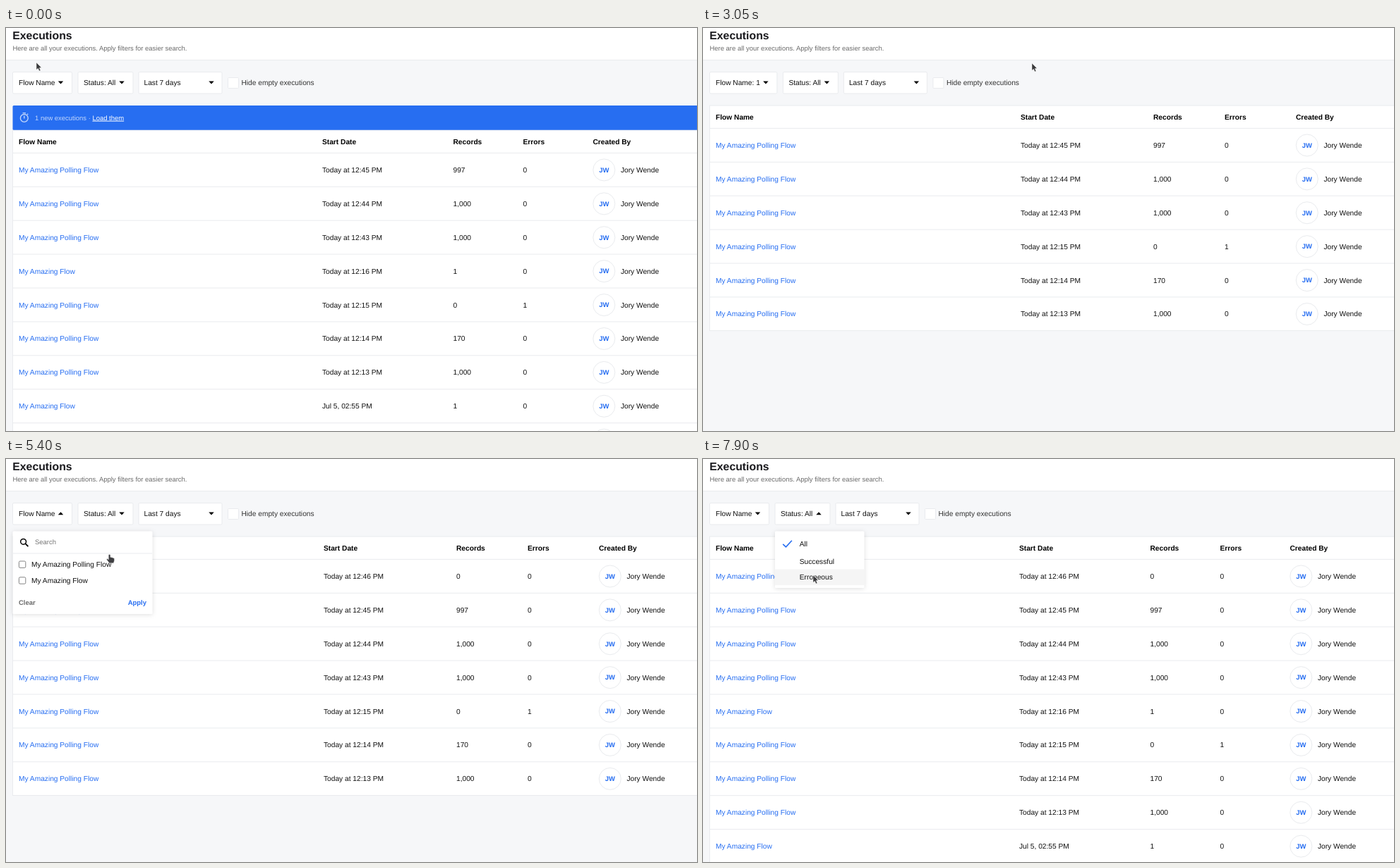
Animation of 979 by 572 pixels, one loop 8000 ms. Source, as an HTML page:

```html
<!DOCTYPE html>
<html lang="en">
<head>
<meta charset="utf-8">
<title>Executions</title>
<style>
  html, body { margin: 0; width: 100%; height: 100%; overflow: hidden; background: #f6f7f9; }
  svg { display: block; }
  text { font-family: "Liberation Sans", Arial, sans-serif; text-rendering: geometricPrecision; white-space: pre; }
  .panel { filter: drop-shadow(0 1px 3px rgba(0, 0, 0, .13)); }
</style>
</head>
<body>
<svg width="979" height="572" viewBox="0 0 979 572">
  <g id="page"></g>
  <g id="cursor"></g>
</svg>
<script>
const LOOP = 8000, STEP = 50;
const BLUE = '#276ef1', GREY = '#6b6b6b', LINE = '#e9ebee';
const OWNER = 'Jory Wende', INITIALS = 'JW';
const BODY = 10.2, SMALL = 9.46;
const ROW = 47.9, HEAD = 32.7, TABLE_TOP = 110, BANNER = 35;

// start date, records, errors, is polling flow
const RUNS = [
  ['Today at 12:46 PM', '0', '0', true],
  ['Today at 12:45 PM', '997', '0', true],
  ['Today at 12:44 PM', '1,000', '0', true],
  ['Today at 12:43 PM', '1,000', '0', true],
  ['Today at 12:16 PM', '1', '0', false],
  ['Today at 12:15 PM', '0', '1', true],
  ['Today at 12:14 PM', '170', '0', true],
  ['Today at 12:13 PM', '1,000', '0', true],
  ['Jul 5, 02:55 PM', '1', '0', false],
  ['Jul 5, 02:54 PM', '1', '0', false],
];
const flowName = polling => polling ? 'My Amazing Polling Flow' : 'My Amazing Flow';

// Each entry changes only the listed parts of the state.
const STATES = [
  [0, { menu: '', banner: true, filtered: false, fresh: false, checked: false, counted: false, focus: false, pollingFirst: false }],
  [1000, { menu: 'flow', focus: true }],
  [1900, { checked: true, focus: false }],
  [2000, { counted: true }],
  [3050, { menu: '', banner: false, filtered: true }],
  [3600, { fresh: true }],
  [4350, { menu: 'flow', focus: true, pollingFirst: true }],
  [5050, { checked: false, focus: false }],
  [5150, { counted: false }],
  [6200, { menu: '' }],
  [6400, { filtered: false }],
  [7100, { menu: 'status' }],
];

const PATH = [
  [0, 43, 49], [150, 43, 49], [400, 41, 98], [550, 38, 85], [1250, 38, 85], [1350, 39, 102],
  [1650, 39, 102], [1750, 80, 174], [2100, 80, 174], [2300, 80, 179], [2550, 186, 206],
  [2650, 186, 206], [2900, 466, 50], [3200, 466, 50], [4000, 82, 83], [4500, 82, 83],
  [4650, 67, 125], [4800, 67, 125], [4900, 70, 147], [5050, 70, 147], [5450, 150, 135],
  [5800, 192, 97], [5850, 192, 97], [6100, 137, 36], [6400, 137, 36], [6550, 142, 85],
  [7250, 142, 85], [7450, 172, 125], [7650, 156, 165], [LOOP, 156, 165],
];
const POINTERS = [
  [0, 'arrow'], [500, 'hand'], [1350, 'arrow'], [1750, 'hand'], [2700, 'arrow'], [3900, 'hand'],
  [4600, 'beam'], [4900, 'hand'], [5500, 'arrow'], [6500, 'hand'], [7900, 'arrow'],
];
const SHAPES = {
  arrow: `<path d="M0 0V10.3L2.4 8.3L4.1 12L5.9 11.2L4.3 7.6L7.2 7.2Z"
    fill="#3a3a3c" stroke="#fff" stroke-opacity=".75" stroke-width=".6"/>`,
  hand: `<path d="M-1.3 1.1Q-1.3 0 0 0T1.3 1.1V4Q2.5 3.4 3.3 4.4Q4.6 4 5.2 5Q6.8 4.8 6.9 6.3V8.6Q6.9 10 6 11V12.2H-.9V11.2
    L-3.8 7.6Q-4.3 6.6 -3.5 6.2T-1.3 7.4Z" fill="#3f3f42" stroke="#fff" stroke-opacity=".75" stroke-width=".5"/>`,
  beam: `<path d="M-2-5.5Q0-5.5 0-4.5Q0-5.5 2-5.5M0-4.5V4.5M-2 5.5Q0 5.5 0 4.5Q0 5.5 2 5.5"
    fill="none" stroke="#333"/>`,
};

const rect = (x, y, w, h, fill, more = '') =>
  `<rect x="${x}" y="${y}" width="${w}" height="${h}" fill="${fill}" ${more}/>`;
const hline = (y, x1 = 9.5, x2 = 979) => `<path d="M${x1} ${y}H${x2}" stroke="${LINE}"/>`;
const stroke = (d, color, width) => `<path d="${d}" fill="none" stroke="${color}" stroke-width="${width}"/>`;

// Text placed by the middle of its line box.
function text(x, mid, str, { size = BODY, fill = '#111', bold = false, anchor = 'start', more = '' } = {}) {
  return `<text x="${x}" y="${(mid + size * .3465).toFixed(2)}" font-size="${size}" fill="${fill}"
    font-weight="${bold ? 700 : 400}" text-anchor="${anchor}" ${more}>${str}</text>`;
}

function caret(x, up) {
  return up ? `<path d="M${x - 3.7} 79.2h7.4l-3.7-3.9z"/>` : `<path d="M${x - 3.7} 75.5h7.4l-3.7 3.9z"/>`;
}

const button = (x, w) => rect(x, 62.5, w, 30.5, '#fff', `stroke="${LINE}" rx="1.5"`);

function toolbar({ menu, counted }) {
  const shift = counted ? 11.4 : 0;
  return button(9.5, 84 + shift) + text(18, 77.5, counted ? 'Flow Name: 1' : 'Flow Name') +
    caret(77.5 + shift, menu === 'flow') +
    `<g transform="translate(${shift})">` +
    button(102, 78) + text(110, 77.5, 'Status: All') + caret(164, menu === 'status') +
    button(188, 118) + text(195.5, 77, 'Last 7 days') + caret(291, false) +
    rect(314.5, 70.5, 15, 15, '#fff', `stroke="${LINE}" rx="1"`) +
    text(333.5, 77.5, 'Hide empty executions', { fill: '#333' }) + '</g>';
}

function banner() {
  const light = '#c3d7fb';
  return rect(9.5, TABLE_TOP, 980, 34.7, BLUE, 'rx="1.5"') +
    `<circle cx="25.8" cy="127.9" r="5.4" fill="none" stroke="${light}" stroke-width="1.35"/>` +
    stroke('M23.6 120.6h4.4M25.8 124.8v3.6M30 123l1.2-1.2', light, 1.35) +
    text(41, 127.4, '1 new executions · <tspan fill="#fff" text-decoration="underline">Load them</tspan>',
      { size: SMALL, fill: light });
}

function table({ filtered, fresh, banner: hasBanner }) {
  const runs = RUNS.slice(fresh ? 0 : 1).filter(run => run[3] || !filtered);
  const [date, records, errors, owner] = filtered ? [450, 638, 739, 840] : [448, 633.5, 732.5, 831.5];
  const top = TABLE_TOP + (hasBanner ? BANNER : 0);
  const header = [[18, 'Flow Name'], [date, 'Start Date'], [records, 'Records'], [errors, 'Errors'], [owner, 'Created By']];
  let out = rect(9.5, top, 980, HEAD + runs.length * ROW - .5, '#fff', `stroke="${LINE}"`);
  out += header.map(([x, label]) => text(x, top + 16, label, { bold: true, fill: '#000' })).join('');
  runs.forEach(([when, count, failed, polling], i) => {
    const y = top + HEAD + i * ROW, mid = y + 23.75;
    out += hline(y - .3) +
      text(18, mid, flowName(polling), { fill: BLUE }) +
      text(date, mid, when) + text(records, mid, count) + text(errors, mid, failed) +
      `<circle cx="${owner + 15.8}" cy="${mid}" r="15.5" fill="#fff" stroke="${LINE}"/>` +
      text(owner + 15.8, mid, INITIALS, { size: SMALL, bold: true, fill: BLUE, anchor: 'middle' }) +
      text(owner + 39.4, mid, OWNER);
  });
  return out + (hasBanner ? banner() : '');
}

const panel = (x, w, h) => rect(x, 102.5, w, h, '#fff', 'class="panel" rx="1.5"');

function checkbox(mid, on) {
  return on
    ? rect(18, mid - 5.2, 10.2, 10.2, '#1a73e8', 'rx="1.6"') +
      stroke(`M20.2 ${mid}l2.1 2.2l3.9-4.6`, '#fff', 1.5)
    : rect(18.4, mid - 4.8, 9.4, 9.4, '#fff', 'stroke="#767676" stroke-width=".9" rx="1.6"');
}

function flowMenu({ pollingFirst, checked, focus }, hover) {
  const order = pollingFirst ? [true, false] : [false, true];
  return panel(9.5, 198, 117.5) + hline(134, 10, 207) +
    `<circle cx="24.6" cy="117.3" r="3.9" fill="none" stroke="#000" stroke-width="1.5"/>` +
    stroke('M27.4 120.1l4 4', '#000', 1.8) +
    text(41, 118, 'Search', { size: SMALL, fill: '#757575' }) +
    (focus ? rect(41, 112.8, .9, 11, '#000') : '') +
    order.map((polling, i) => {
      const mid = 149.8 + i * 22.8;
      return (hover === i ? rect(9.5, mid - 11.4, 198, 22.6, '#f5f5f5') : '') +
        checkbox(mid, polling && checked) + text(36, mid, flowName(polling));
    }).join('') +
    text(18, 203.5, 'Clear', { size: SMALL, bold: true, fill: GREY }) +
    text(199, 203.5, 'Apply', { size: SMALL, bold: true, fill: BLUE, anchor: 'end' });
}

function statusMenu(hover) {
  return panel(102, 126.5, 80.5) +
    (hover >= 0 ? rect(102, 133.9 + hover * 22.6, 126.5, 22.6, '#f5f5f5') : '') +
    stroke('M113.2 120.8l4.3 4.1l8.4-9.2', BLUE, 1.6) +
    text(136.8, 120, 'All') + text(136.8, 145.2, 'Successful') + text(136.8, 167.7, 'Erroneous');
}

function page(state, hover) {
  return rect(0, 0, 979, 572, '#f6f7f9') + rect(0, 0, 979, 45, '#fff') + hline(45.5, 0) +
    text(9.3, 10.3, 'Executions', { size: 15.8, bold: true, fill: '#1a1a1e' }) +
    text(9.5, 29, 'Here are all your executions. Apply filters for easier search.', { size: SMALL, fill: GREY }) +
    toolbar(state) + table(state) +
    (state.menu === 'flow' ? flowMenu(state, hover) : state.menu === 'status' ? statusMenu(hover) : '');
}

const latest = (list, t) => list.filter(([at]) => at <= t).pop()[1];
const stateAt = t => Object.assign({}, ...STATES.filter(([at]) => at <= t).map(([, change]) => change));

function pointAt(t) {
  const i = PATH.findIndex(([at]) => at > t);
  const [t0, x0, y0] = PATH[i - 1], [t1, x1, y1] = PATH[i];
  const p = (t - t0) / (t1 - t0), k = p * p * (3 - 2 * p);
  return [x0 + (x1 - x0) * k, y0 + (y1 - y0) * k];
}

function hoverAt(menu, x, y) {
  const [top, left, right] = menu === 'flow' ? [138.4, 10, 207] : [133.9, 102, 228];
  const item = Math.floor((y - top) / 22.7);
  return menu && x > left && x < right && (item === 0 || item === 1) ? item : -1;
}

const pageLayer = document.getElementById('page'), cursorLayer = document.getElementById('cursor');
let shownPage, shownPointer;

function frame() {
  const t = Math.floor((performance.now() - start) % LOOP / STEP) * STEP;
  const state = stateAt(t), [x, y] = pointAt(t), pointer = latest(POINTERS, t);
  const hover = hoverAt(state.menu, x, y), key = JSON.stringify([state, hover]);
  if (key !== shownPage) pageLayer.innerHTML = page(state, hover);
  if (pointer !== shownPointer) cursorLayer.innerHTML = SHAPES[pointer];
  cursorLayer.setAttribute('transform', `translate(${x.toFixed(1)} ${y.toFixed(1)})`);
  shownPage = key;
  shownPointer = pointer;
  requestAnimationFrame(frame);
}

const start = performance.now();
frame();
</script>
</body>
</html>
```
